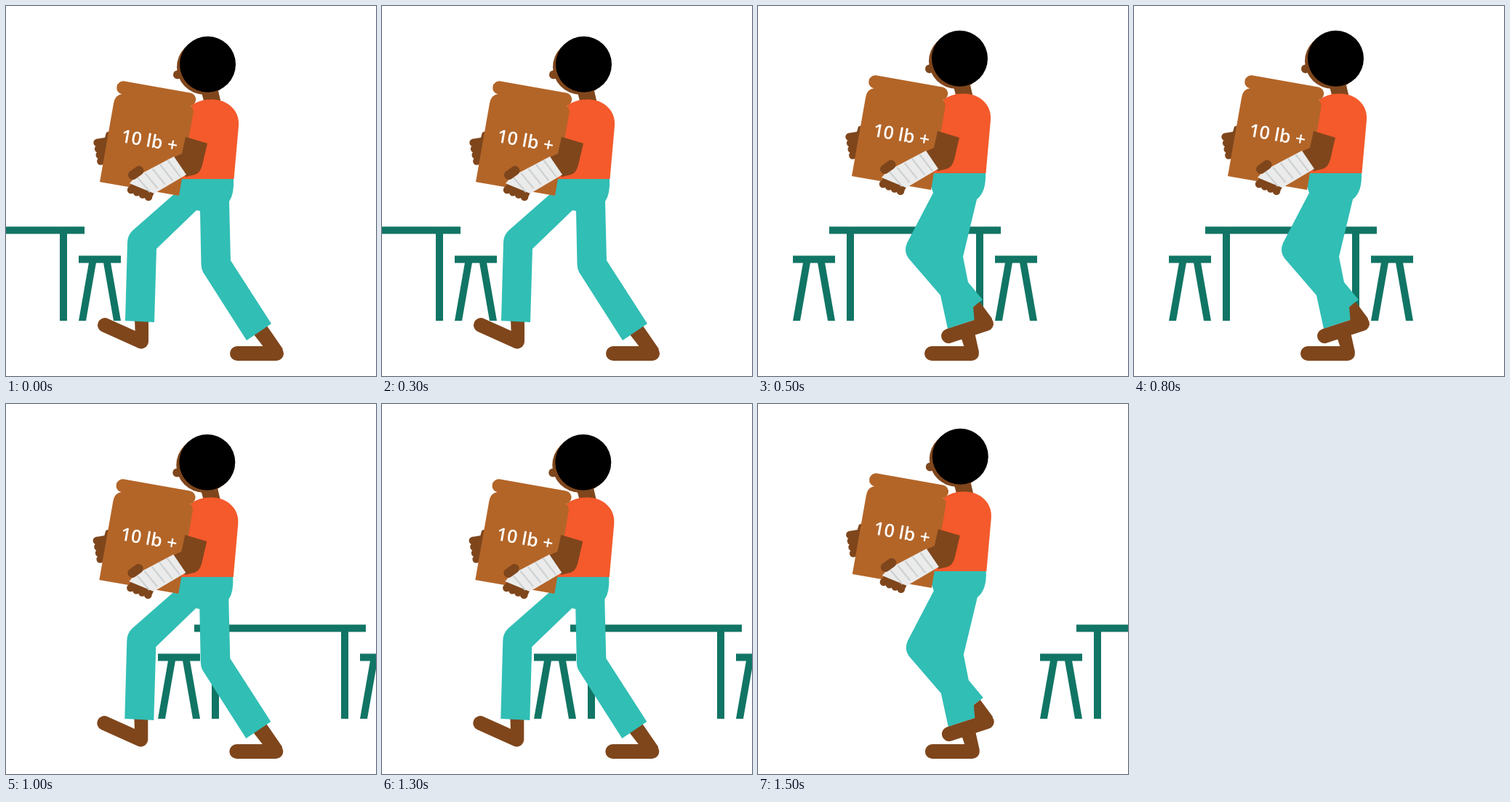
An HTML page with a canvas that plays this animation: 509x509 px, repeating every 2000 ms.

```html
<!DOCTYPE html>
<html lang="en">
<head>
<meta charset="utf-8">
<title>Carrying a heavy box</title>
<style>
html, body { margin: 0; width: 100%; height: 100%; overflow: hidden; background: #fff; }
canvas { display: block; width: 100vw; height: 100vh; }
</style>
</head>
<body>
<canvas id="stage" width="509" height="509"></canvas>
<script>
const ctx = document.getElementById('stage').getContext('2d');
const STEP = 500;
const SKIN = '#7f461c', HAIR = '#000', SHIRT = '#f45a2b', PANTS = '#31beb5';
const BOX = '#b36528', WOOD = '#117565', WRAP = '#ebebeb', CREASE = '#cdd1d2';

// Body offset and furniture offset for each step of the walk.
const poses = [
  { stride: true, x: 0, y: 8, room: -226 },
  { stride: false, x: 0, y: 0, room: 0 },
  { stride: true, x: -0.7, y: 8, room: 161 },
  { stride: false, x: 0.8, y: 0, room: 340 }
];

function shape(d, color) {
  ctx.fillStyle = color;
  ctx.fill(new Path2D(d));
}

function bar(x1, y1, x2, y2, width, color, cap = 'round') {
  ctx.strokeStyle = color;
  ctx.lineWidth = width;
  ctx.lineCap = cap;
  ctx.beginPath();
  ctx.moveTo(x1, y1);
  ctx.lineTo(x2, y2);
  ctx.stroke();
}

function disc(x, y, r, color) {
  ctx.fillStyle = color;
  ctx.beginPath();
  ctx.arc(x, y, r, 0, Math.PI * 2);
  ctx.fill();
}

function at(x, y, draw) {
  ctx.save();
  ctx.translate(x, y);
  draw();
  ctx.restore();
}

function stool() {
  shape('M0 343.5H58V353.5H0Z M14 353H24L10 433H0Z M34 353H44L58 433H48Z', WOOD);
}

function furniture() {
  shape('M98 303.5H334V313.5H98Z M122 313H132V433H122Z M300 313H310V433H300Z', WOOD);
  at(48, 0, stool);
  at(326, 0, stool);
}

function strideLegs() {
  shape('M177 430H196V461L178 458Z M341 452L359 440L381 472L366 484Z', SKIN);
  bar(136, 439, 186, 461.5, 20, SKIN);
  bar(318, 478, 372, 478, 20, SKIN);
  shape(`M242 238H313Q314 259 307 269L309 350L365 437L331 460L271 366
    Q268.5 361 268.5 355L267 282L262 281L207 334L204 435L164 433L167 326
    Q167 316 174 309L231 259L236 240Z`, PANTS);
}

function passingLegs() {
  shape('M279 455L298 449L304 476L288 482Z', SKIN);
  bar(239, 478, 294, 478, 20, SKIN);
  shape(`M242 230H313Q314 256 301 266L282 345L289 380L309 404L296 414L300 431
    L261 444L251 398L207 347Q200 338 205 326L241 257L237 245Z`, PANTS);
  shape('M296 414L305 407L322 430L316 445L298 437Z', SKIN);
  bar(262, 454, 314, 437, 20, SKIN);
}

function head() {
  shape('M266 100H290L296 126H273Z', SKIN);
  disc(273, 76, 38, SKIN);
  disc(236, 86.5, 6, SKIN);
  disc(277.5, 72.3, 38.5, HAIR);
}

function box() {
  shape('M129 234L148 126Q150 114 160 113L250 127Q259 131 257.5 139L238 253Z', BOX);
  bar(161.5, 104.5, 252, 120.5, 18.5, BOX);
  at(157.3, 179, () => {
    ctx.rotate(Math.PI / 18);
    ctx.fillStyle = '#fff';
    ctx.font = '600 25px "Open Sans", "Noto Sans", sans-serif';
    ctx.fillText('10 lb +', 0, 0);
  });
}

function farHand() {
  shape('M124 175L136 173L138 166L146 163L141 202L131 208Z', SKIN);
  for (let i = 0; i < 4; i++) disc(125.5 + i * 1.6, 180 + i * 8.5, 5.2, SKIN);
}

function nearArm() {
  shape('M247 172L277 181L270 211Q267 222 260 224L247 227L231 200L242 195Z', SKIN);
  shape('M173 236L204 249L200 257L168 243Z', SKIN);
  for (let i = 0; i < 4; i++) disc(172 + i * 8, 245 + i * 3.3, 5.2, SKIN);
  shape('M231 199L248 224L204 250L170 236L178 227Z', WRAP);
  for (let i = 0; i < 5; i++) {
    bar(181 + i * 10.3, 228 - i * 6, 198 + i * 10.5, 248 - i * 5.2, 2.2, CREASE, 'butt');
  }
  bar(174.5, 224.5, 183, 218.5, 13, SKIN);
}

function upperBody() {
  head();
  shape('M250 134Q261 120.5 283 120.5C307 120.5 322 138 320 157L313.5 230H239Z', SHIRT);
  farHand();
  box();
  nearArm();
}

function draw({ stride, x, y, room }) {
  ctx.fillStyle = '#fff';
  ctx.fillRect(0, 0, 509, 509);
  at(room, 0, furniture);
  at(x, 0, stride ? strideLegs : passingLegs);
  at(x, y, upperBody);
}

function frame() {
  draw(poses[Math.floor(performance.now() / STEP) % poses.length]);
  requestAnimationFrame(frame);
}
frame();
</script>
</body>
</html>
```
